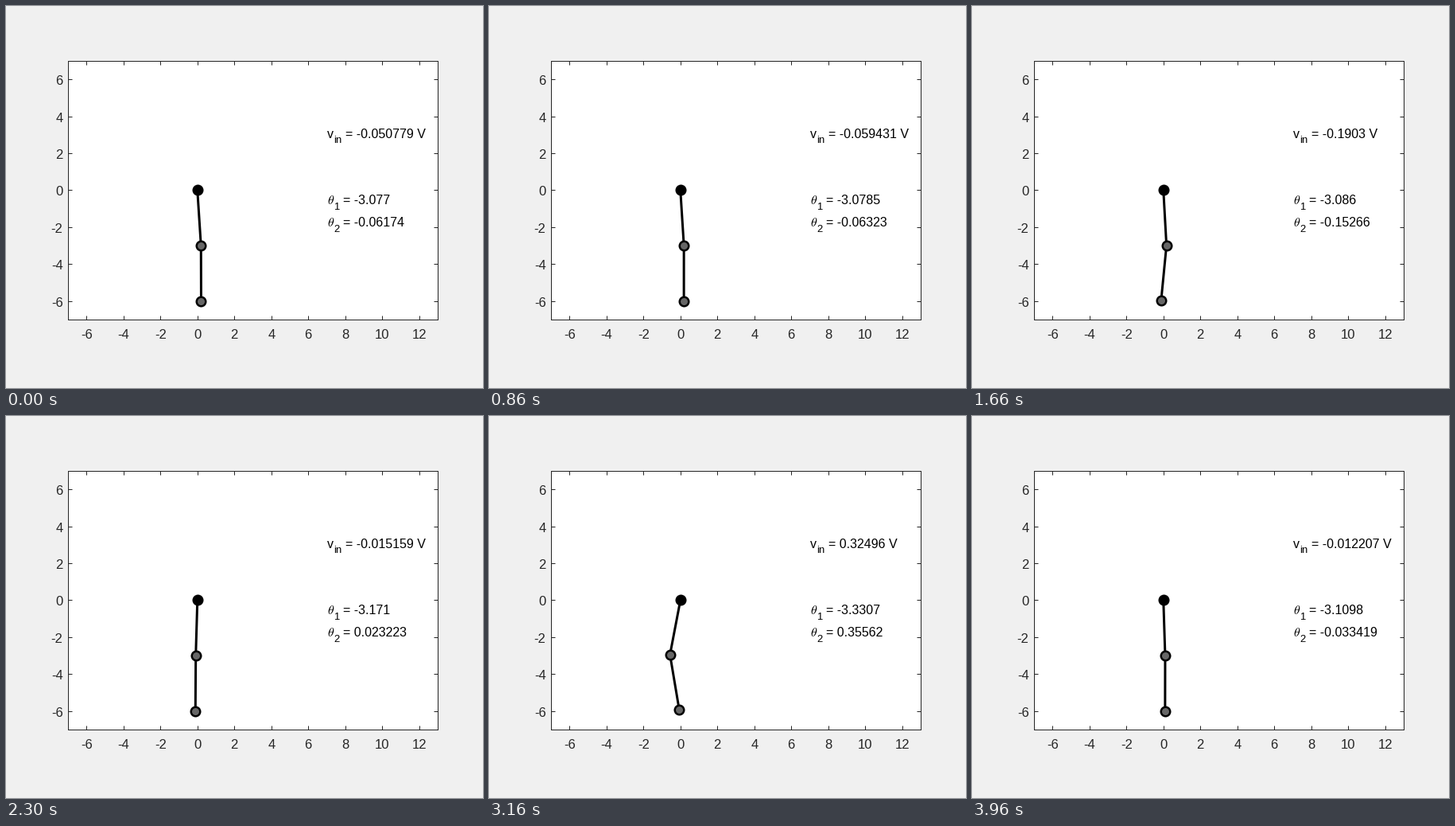
These frames come from a looping animation (600x480 px, 4000 ms). A matplotlib script:

```python
import numpy as np
import matplotlib.pyplot as plt
from matplotlib.animation import FuncAnimation

W, H, DPI = 600, 480, 100
PX = 72 / DPI                      # points per pixel
FRAMES, INTERVAL = 200, 20
LINK = 3
LEFT, RIGHT, TOP, BOTTOM = 78, 543, 69, 394
INK = "#262626"

plt.rcParams.update({
    "font.family": "Liberation Sans",
    "mathtext.fontset": "cm",
})

# step, theta1, theta2, input voltage
POSES = np.array([
    (0, -3.077, -0.06174, -0.050779),
    (26, -3.0785, -0.06323, -0.059431),
    (50, -3.086, -0.15266, -0.1903),
    (69, -3.171, 0.023223, -0.015159),
    (73, -3.25, -0.08, -0.2),
    (81, -3.7559, -0.41799, -0.93724),
    (84, -3.86, -0.48, -0.75),
    (95, -3.3307, 0.35562, 0.32496),
    (107, -3.125, -0.14, -0.13),
    (119, -3.1098, -0.033419, -0.012207),
])
STEPS, VALUES = POSES[:, 0], POSES[:, 1:]
SLOPES = np.gradient(VALUES, STEPS, axis=0)


def state(step):
    """Cubic Hermite curve through the poses, with a wobble in long rests."""
    i = min(np.searchsorted(STEPS, step, side="right") - 1, len(STEPS) - 2)
    h = STEPS[i + 1] - STEPS[i]
    u = (step - STEPS[i]) / h
    blend = u * u * (3 - 2 * u)
    curve = (VALUES[i] * (1 - blend) + VALUES[i + 1] * blend
             + h * u * (1 - u) * (SLOPES[i] * (1 - u) - SLOPES[i + 1] * u))
    wobble = -0.0015 * step * np.sin(2 * np.pi * u * (h // 18))
    return curve + wobble * np.array([0, 1, 0.9])


fig = plt.figure(figsize=(W / DPI, H / DPI), dpi=DPI, facecolor="#f0f0f0")
ax = fig.add_axes([LEFT / W, 1 - BOTTOM / H,
                   (RIGHT - LEFT) / W, (BOTTOM - TOP) / H])
ax.set(xlim=(-7, 13), ylim=(-7, 7),
       xticks=range(-6, 13, 2), yticks=range(-6, 7, 2))
ax.tick_params(direction="in", top=True, right=True, length=4.6 * PX,
               width=PX, color=INK, labelbottom=False, labelleft=False)
for spine in ax.spines.values():
    spine.set(linewidth=PX, color=INK)


def label(x, y, text, size=16.0, color="black", ha="left"):
    """Text with its baseline at a pixel position."""
    return fig.text(x / W, 1 - y / H, text, fontsize=size * PX, color=color,
                    ha=ha, va="baseline")


for n in range(-6, 13, 2):
    x = LEFT + (n + 7) * (RIGHT - LEFT) / 20
    label(x, 417.5, str(n), 16.67, INK, "center")
for n in range(-6, 7, 2):
    y = BOTTOM - (n + 7) * (BOTTOM - TOP) / 14
    label(71.5, y + 7, str(n), 16.67, INK, "right")


def readout(y, symbol, sub, x):
    label(403.7, y, symbol)
    label(412.3, y + 7, sub, size=13)
    return label(x, y, "")


v_text = readout(165.5, "v", "in", 427.3)
t1_text = readout(249.3, r"$\theta$", "1", 424.3)
t2_text = readout(277.3, r"$\theta$", "2", 424.3)

rods, = ax.plot([], [], color="black", lw=3 * PX, zorder=3)
dot = dict(marker="o", ls="", ms=11.5 * PX, mec="black",
           mew=2.5 * PX, zorder=4)
joints, = ax.plot([], [], mfc="#666666", **dot)
ax.plot([0], [0], mfc="black", **dot)


def update(frame):
    step = (3 * frame + 1) // 5    # 30 poses a second
    t1, t2, volts = state(step)
    angles = np.array([t1, t1 + t2])
    x = np.concatenate(([0], np.cumsum(-LINK * np.sin(angles))))
    y = np.concatenate(([0], np.cumsum(LINK * np.cos(angles))))
    rods.set_data(x, y)
    joints.set_data(x[1:], y[1:])
    v_text.set_text(f"= {volts:.5g} V")
    t1_text.set_text(f"= {t1:.5g}")
    t2_text.set_text(f"= {t2:.5g}")
    return rods, joints, v_text, t1_text, t2_text


anim = FuncAnimation(fig, update, frames=FRAMES, interval=INTERVAL,
                     repeat=True, repeat_delay=0)
plt.show()
```
